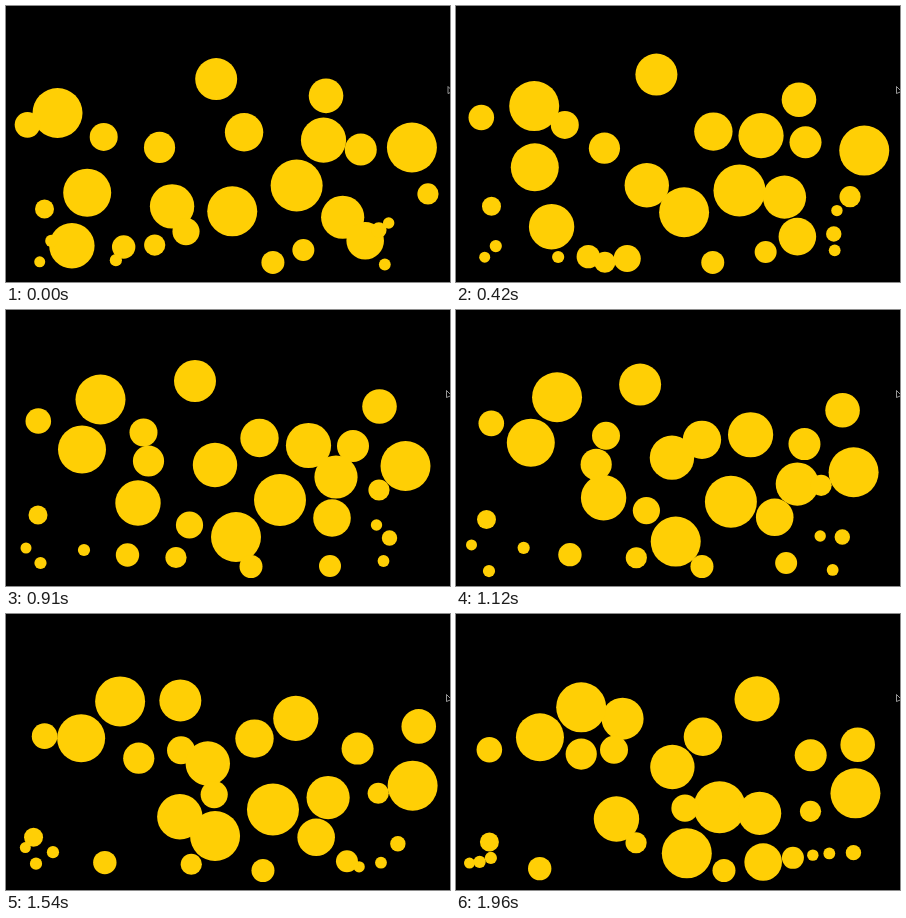
Recreate the animation shown at these times as an HTML page with a canvas. Size 444 by 276 pixels, loop 2030 ms.

```html
<!DOCTYPE html>
<html lang="en">
<head>
<meta charset="utf-8">
<title>Bouncy balls</title>
<style>
  html, body { margin: 0; width: 100%; height: 100%; overflow: hidden; background: #000; }
  canvas { display: block; }
</style>
</head>
<body>
<canvas id="stage" width="444" height="276"></canvas>
<script>
const ctx = document.getElementById('stage').getContext('2d');
const POSE_MS = 70, POSES = 29, MIDDLE = 13, SUBSTEPS = 3;
const GRAVITY = 0.019, SPRING = 0.05, BOUNCE = 0.9;
const LEFT = 8, RIGHT = 436, FLOOR = 268;
const balls = [];

// Radius, centre and velocity per pose, all at the middle of the loop.
const ball = (r, x, y, vx, vy) =>
  balls.push({ r, x, y, vx: vx / SUBSTEPS, vy: vy / SUBSTEPS });

ball(21, 189, 71, -1.63, 0.92);
ball(17.3, 373.5, 96.5, 4.36, 0.97);
ball(25, 94.5, 89.5, 2.18, -1.03);
ball(22.6, 302.5, 135.5, -2.4, -3.6);
ball(12.8, 32.3, 111, 1, 0.5);
ball(14, 137.5, 122.5, 4.2, 1);
ball(15.6, 142.5, 151, -0.8, 2);
ball(19.2, 253.5, 128, -2.8, 0.5);
ball(16, 347, 136, 0.18, -0.3);
ball(25, 399.5, 156, -1.25, 2.2);
ball(26, 274, 190, 0.3, 0.3);
ball(24, 76, 139.5, -0.4, -2.55);
ball(22.2, 209, 155, 2.6, -2.9);
ball(25, 230, 227, -1.6, 4.2);
ball(21.6, 330, 167, 3.8, 2.5);
ball(10.6, 373, 180, -2.4, -2.3);
ball(9.5, 32, 205, -0.5, 1.24);
ball(22.7, 132, 193, 5.2, -3.4);
ball(11.7, 121.5, 245, -2.52, -0.4);
ball(6.1, 78, 240, -3.45, -1);
ball(10.6, 170, 247.5, 3.45, -0.2);
ball(13.6, 183.5, 215, 2.3, -5.1);
ball(11.5, 245, 256.5, -1.5, 0);
ball(11, 324, 256, 2.05, 2);
ball(18.8, 326, 208, -2, -1.8);
ball(5.7, 370.5, 215, -2.1, 3.4);
ball(7.7, 383.5, 228, 0.93, -0.6);
ball(5.9, 377.5, 251, -0.28, 2.7);
ball(5.5, 20, 238, -1.5, -1.3);
ball(6.1, 34.5, 253, -0.5, 2.4);

// Gravity, and a soft spring between overlapping balls.
function accelerate(world, dir) {
  world.forEach((a, i) => {
    a.vy += GRAVITY * dir;
    for (const b of world.slice(i + 1)) {
      const dx = b.x - a.x, dy = b.y - a.y, dist = Math.hypot(dx, dy);
      const overlap = a.r + b.r - dist;
      if (overlap <= 0) continue;
      const force = SPRING * overlap * dir / dist;
      a.vx -= force * dx;
      a.vy -= force * dy;
      b.vx += force * dx;
      b.vy += force * dy;
    }
  });
}

function move(world, dir) {
  const rebound = -Math.pow(BOUNCE, dir);
  for (const b of world) {
    b.x += b.vx * dir;
    b.y += b.vy * dir;
    const x = Math.min(Math.max(b.x, LEFT + b.r), RIGHT - b.r);
    const y = Math.min(b.y, FLOOR - b.r);
    if (x !== b.x) b.vx *= rebound;
    if (y !== b.y) b.vy *= rebound;
    b.x = x;
    b.y = y;
  }
}

// Runs the same physics forwards or backwards and stores each pose.
const poses = [];
function run(dir) {
  const world = balls.map(b => ({ ...b }));
  const phases = dir > 0 ? [accelerate, move] : [move, accelerate];
  for (let n = MIDDLE; n >= 0 && n < POSES; n += dir) {
    poses[n] = world.map(({ r, x, y }) => ({ r, x, y }));
    for (let k = 0; k < SUBSTEPS; k++) phases.forEach(phase => phase(world, dir));
  }
}
run(-1);
run(1);

function pointer(x, y) {
  ctx.beginPath();
  ctx.moveTo(x, y);
  ctx.lineTo(x, y + 7);
  ctx.lineTo(x + 5, y + 5);
  ctx.closePath();
  ctx.strokeStyle = '#bbb';
  ctx.lineWidth = 0.8;
  ctx.stroke();
}

function draw(n) {
  ctx.fillStyle = '#000';
  ctx.fillRect(0, 0, 444, 276);
  ctx.fillStyle = '#ffcf05';
  for (const { r, x, y } of poses[n]) {
    ctx.beginPath();
    ctx.arc(x, y, r, 0, Math.PI * 2);
    ctx.fill();
  }
  pointer(n < 2 ? 442 : 440.5, 80.5);
}

const start = performance.now();
function tick() {
  draw(Math.floor((performance.now() - start) / POSE_MS) % POSES);
  requestAnimationFrame(tick);
}
tick();
</script>
</body>
</html>
```
